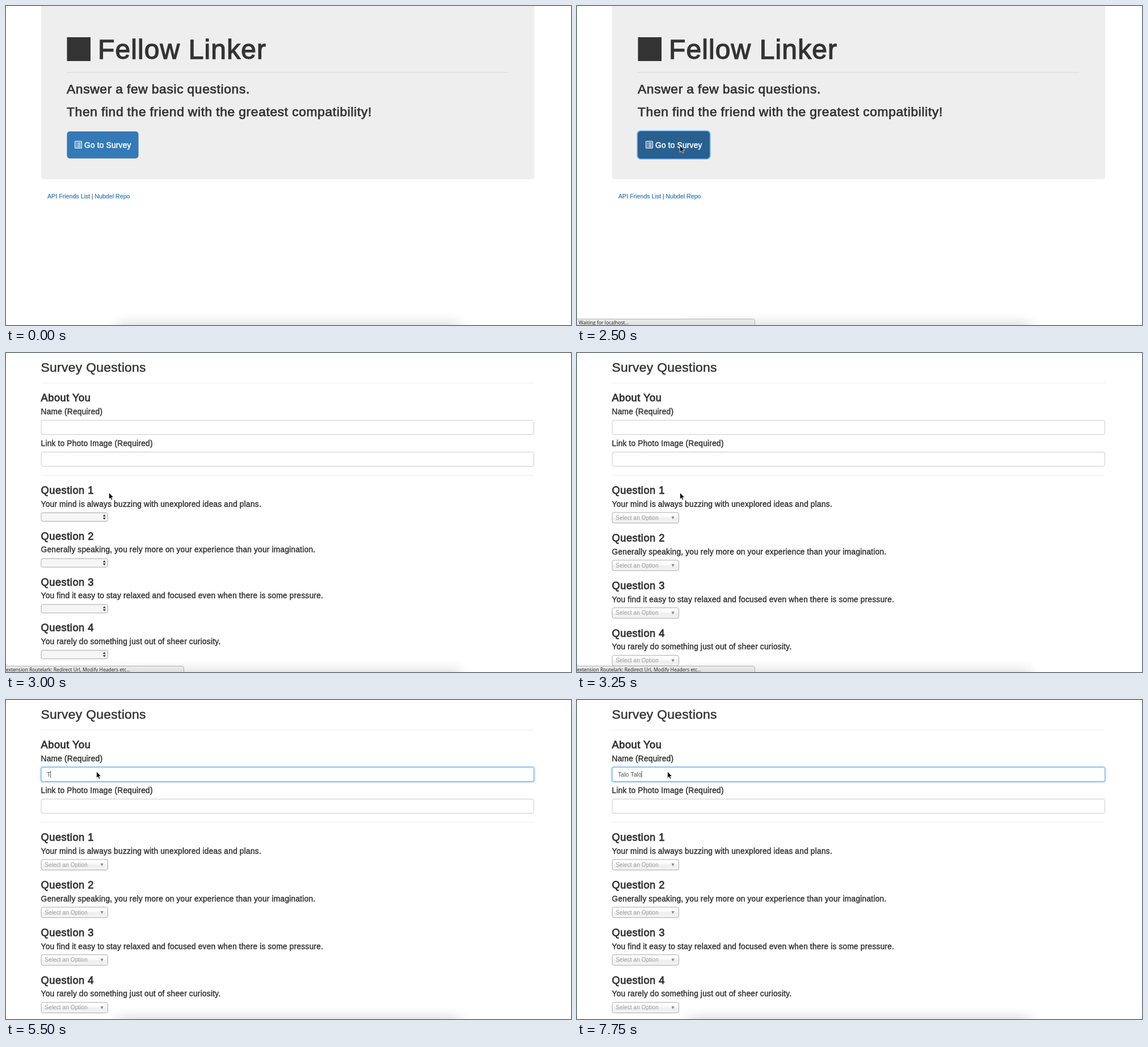
These frames come from a looping animation (996x562 px, 8 s). An HTML page:

```html
<!DOCTYPE html>
<html lang="en">
<head>
<meta charset="utf-8">
<title>Fellow Linker</title>
<style>
  html, body { margin: 0; width: 100%; height: 100%; overflow: hidden; background: #fff; }
  svg { display: block; width: 100%; height: 100%; }
  text { font-family: "Liberation Sans", Arial, sans-serif; fill: #333; white-space: pre; }
  .h1 { font-size: 48px; letter-spacing: .023em; stroke: #333; stroke-width: 1.3px; }
  .lead { font-size: 22.86px; letter-spacing: .027em; word-spacing: -.027em; stroke: #333; stroke-width: .75px; }
  .h2 { font-size: 22.86px; letter-spacing: .0134em; stroke: #333; stroke-width: .5px; }
  .h3 { font-size: 18.29px; letter-spacing: .028em; stroke: #333; stroke-width: .8px; }
  .h4 { font-size: 13.72px; letter-spacing: .0186em; word-spacing: -.0186em; stroke: #333; stroke-width: .45px; }
  .btn { font-size: 13.72px; letter-spacing: .0152em; fill: #fff; stroke: #fff; stroke-width: .5px; }
  .small { font-size: 10.67px; }
  .link { font-size: 10.67px; fill: #2f73b3; stroke: #2f73b3; stroke-width: .2px; }
  .typed { font-size: 10.67px; fill: #555; }
  .pick { font-size: 10px; letter-spacing: .01em; fill: #999; }
  .status { font-family: "Open Sans", "Noto Sans", sans-serif; font-size: 8.55px; fill: #222; }
</style>
</head>
<body>
<svg id="stage" viewBox="0 0 996 562" preserveAspectRatio="none">
  <defs>
    <linearGradient id="pickFill" x2="0" y2="1">
      <stop offset=".2" stop-color="#fff"/><stop offset=".5" stop-color="#f6f6f6"/>
      <stop offset=".52" stop-color="#eee"/><stop offset="1" stop-color="#f4f4f4"/>
    </linearGradient>
    <linearGradient id="barFill" x2="0" y2="1">
      <stop offset="0" stop-color="#ececec"/><stop offset="1" stop-color="#dedede"/>
    </linearGradient>
    <filter id="dockBlur" x="-20%" y="-150%" width="140%" height="400%"><feGaussianBlur stdDeviation="12"/></filter>
    <filter id="glowBlur" filterUnits="userSpaceOnUse" x="50" y="105" width="900" height="55"><feGaussianBlur stdDeviation="1.5"/></filter>
    <filter id="ringBlur" filterUnits="userSpaceOnUse" x="95" y="210" width="150" height="70"><feGaussianBlur stdDeviation=".6"/></filter>
  </defs>
  <rect width="996" height="562" fill="#fff"/>
  <g id="home"></g>
  <g id="survey"></g>
  <rect x="196" y="562" width="604" height="50" fill="#000" opacity=".19" filter="url(#dockBlur)"/>
  <g id="status">
    <path d="M-2 551.5H310Q313.5 551.5 313.5 555V564H-2z" fill="url(#barFill)" stroke="#b2b2b2"/>
    <text id="waiting" class="status" x="3" y="561.3">Waiting for localhost...</text>
    <text id="extension" class="status" x="219" y="561.3" text-anchor="end">extension Routelark: Redirect Url, Modify Headers etc...</text>
  </g>
  <path id="cursor" d="M0 0V11.6L2.6 9.2L4.4 13.2L6.4 12.3L4.6 8.4H8.2z" fill="#000" stroke="#fff" stroke-width=".8"/>
</svg>
<script>
const LOOP = 8000;
const $ = id => document.getElementById(id);

const text = (x, y, cls, s, extra = '') => `<text x="${x}" y="${y}" class="${cls}" ${extra}>${s}</text>`;
const rect = (x, y, w, h, fill, extra = '') =>
  `<rect x="${x}" y="${y}" width="${w}" height="${h}" fill="${fill}" ${extra}/>`;
const field = (y, id) => rect(62, y, 868.5, 25, '#fff', `rx="3" stroke="#ccc" id="${id}"`);

function listIcon(x, y) {
  let s = rect(x + .6, y + .6, 11.8, 12, 'none', 'rx="1" stroke="#fff" stroke-width="1.2"');
  for (let i = 0; i < 4; i++) {
    const row = y + 2.7 + i * 2.3;
    s += rect(x + 2.4, row, 1.5, 1.2, '#fff') + rect(x + 4.9, row, 5.8, 1.2, '#fff');
  }
  return s;
}

function homePage() {
  return rect(61.7, -10, 869.5, 315, '#eee', 'rx="4.6"') +
    rect(107.5, 55, 41.5, 42, '#333') +
    text(162, 93, 'h1', 'Fellow Linker') +
    rect(107.5, 116.5, 777.5, 1, '#d8d8d8') +
    text(107, 153.5, 'lead', 'Answer a few basic questions.') +
    text(107, 194, 'lead', 'Then find the friend with the greatest compatibility!') +
    rect(107, 220.7, 127, 48, 'none', 'id="ring" rx="5" stroke="#62a3f0" stroke-width="3" filter="url(#ringBlur)"') +
    rect(108, 221.5, 125, 46.5, '#337ab7', 'id="button" rx="4.2" stroke="#2e6da4"') +
    listIcon(121, 237.8) +
    text(138, 250, 'btn', 'Go to Survey') +
    text(73, 339.3, 'link', 'API Friends List') +
    text(150.8, 339.3, 'small', '|') +
    text(156.3, 339.3, 'link', 'Nubdel Repo');
}

const questions = [
  'Your mind is always buzzing with unexplored ideas and plans.',
  'Generally speaking, you rely more on your experience than your imagination.',
  'You find it easy to stay relaxed and focused even when there is some pressure.',
  'You rarely do something just out of sheer curiosity.'
];

const nativeSelect = y => rect(62, y + .5, 117.5, 15, '#f6f6f6', 'rx="3" stroke="#a9a9a9"') +
  `<path d="M170.8 ${y + 7}l2.5 -3.6l2.5 3.6zM170.8 ${y + 9}l2.5 3.6l2.5 -3.6z" fill="#333"/>`;

const styledSelect = y => rect(62, y, 117.5, 18.5, 'url(#pickFill)', 'rx="3.5" stroke="#aaa"') +
  text(68.3, y + 12.6, 'pick', 'Select an Option') +
  `<path d="M166.5 ${y + 7}h5.2l-2.6 5z" fill="#888"/>`;

const questionList = (id, pitch, select) => `<g id="${id}">` + questions.map((q, i) => {
  const y = i * pitch;
  return text(61.5, 248 + y, 'h3', 'Question ' + (i + 1)) + text(61.5, 270.7 + y, 'h4', q) + select(281 + y);
}).join('') + '</g>';

function surveyPage() {
  return text(61.5, 33, 'h2', 'Survey Questions') +
    rect(62, 52.5, 869, 1, '#eee') +
    text(61.5, 85.4, 'h3', 'About You') +
    text(61.5, 108.2, 'h4', 'Name (Required)') +
    rect(62, 118.8, 868.5, 25, 'none', 'id="glow" rx="3" stroke="#66afe9" stroke-width="2" filter="url(#glowBlur)"') +
    field(118.5, 'name') +
    text(72, 135, 'typed', '', 'id="typed"') +
    rect(72, 125, 1, 12, '#555', 'id="caret"') +
    text(61.5, 164, 'h4', 'Link to Photo Image (Required)') +
    field(174.5, 'photo') +
    rect(62, 214.8, 869, 1, '#eee') +
    questionList('plain', 80.75, nativeSelect) +
    questionList('styled', 83.9, styledSelect);
}

$('home').innerHTML = homePage();
$('survey').innerHTML = surveyPage();

// Each track is a list of [start time, value]; values hold until the next entry.
const entry = 'Talo Talo';
const pointer = [[0, null], [750, [307, 90]], [1000, [288, 169]], [1250, [180.5, 246]],
  [1500, [181.5, 246]], [4000, [166.5, 115.5]], [4250, [159.5, 126]]];
const letters = [[0, 0], [5500, 1], [5750, 3], [6000, 4], [6250, 5], [7000, 6], [7250, 7], [7500, 8], [7750, 9]];
const caretOn = [[0, false], [4500, true], [5000, false], [5500, true], [6750, false], [7000, true]];

const at = (track, t) => track.reduce((v, [start, value]) => t >= start ? value : v, null);
const show = (id, on) => $(id).setAttribute('display', on ? 'inline' : 'none');

function draw(t) {
  const pressed = t >= 2500;
  show('home', t < 3000);
  show('survey', t >= 3000);
  show('ring', pressed);
  $('button').setAttribute('fill', pressed ? '#286090' : '#337ab7');
  $('button').setAttribute('stroke', pressed ? '#204d74' : '#2e6da4');

  show('status', pressed && t < 3750);
  show('waiting', t < 2750);
  show('extension', t >= 2750);

  show('plain', t < 3250);
  show('styled', t >= 3250);
  show('glow', t >= 4750);
  $('name').setAttribute('stroke', t < 4500 ? '#ccc' : t < 4750 ? '#a5c9e3' : '#66afe9');

  const count = at(letters, t);
  $('typed').textContent = entry.slice(0, count);
  show('caret', at(caretOn, t));
  if (t >= 3000) $('caret').setAttribute('x', 71.6 + (count ? $('typed').getComputedTextLength() : 0));

  const tip = at(pointer, t);
  show('cursor', tip);
  if (tip) $('cursor').setAttribute('transform', `translate(${tip})`);
}

const began = performance.now();
function tick() {
  draw((performance.now() - began) % LOOP);
  requestAnimationFrame(tick);
}
tick();
</script>
</body>
</html>
```
